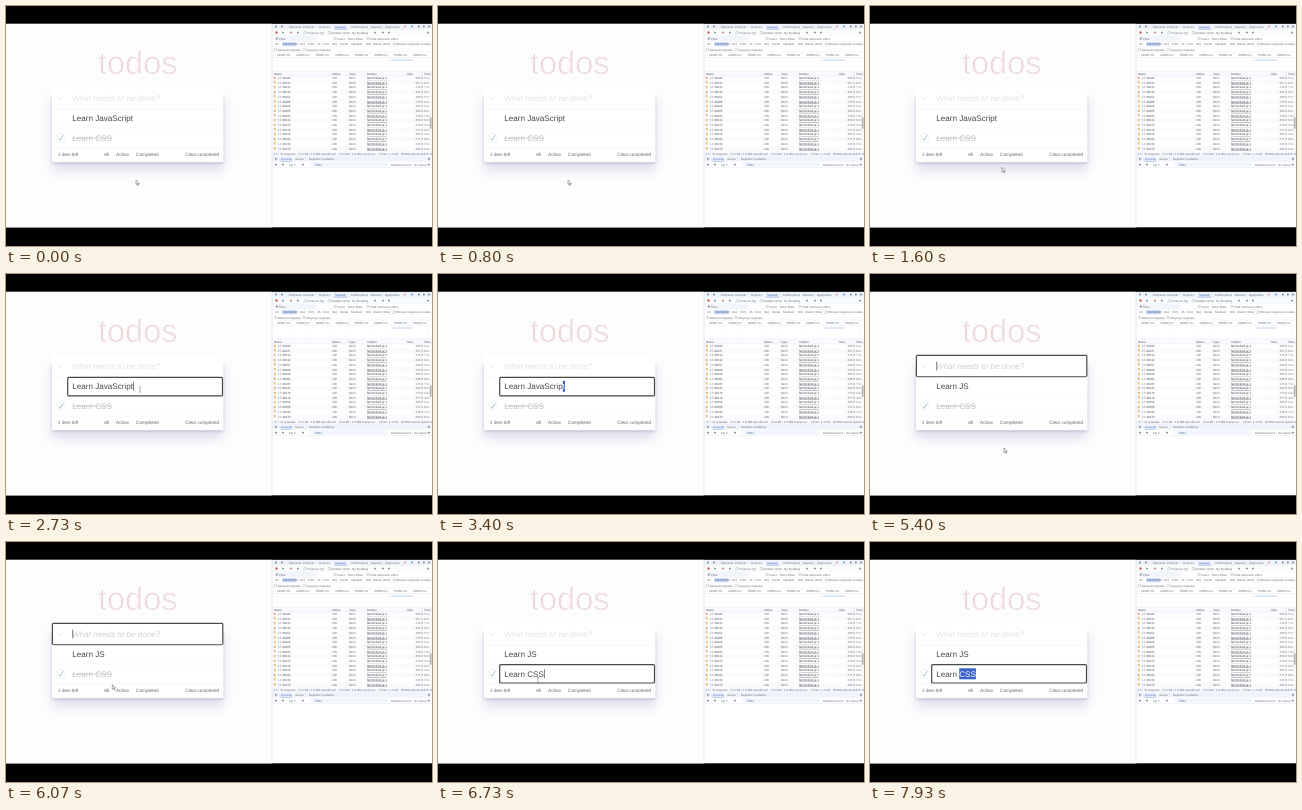
Animation, 426 px wide and 240 px high, one loop 8000 ms. Source, as an HTML page:

```html
<!DOCTYPE html>
<html lang="en">
<head>
<meta charset="utf-8">
<title>todos</title>
<style>
  html, body { margin: 0; width: 100%; height: 100%; overflow: hidden; background: #000; }
  svg { display: block; width: 100vw; height: 100vh; }
  text { font-family: "Liberation Sans", Arial, sans-serif; white-space: pre; text-rendering: geometricPrecision; }
</style>
</head>
<body>
<svg id="stage" viewBox="0 0 426 240"></svg>
<script>
const LOOP = 8000;
const INK = '#484848';
const TOP = 17.7, HEIGHT = 203.9;
const stage = document.getElementById('stage');

const text = (x, y, s, size, fill = INK, extra = '') =>
  `<text x="${x}" y="${y}" font-size="${size}" fill="${fill}" ${extra}>${s}</text>`;
const rect = (x, y, w, h, fill, extra = '') =>
  `<rect x="${x}" y="${y}" width="${w}" height="${h}" fill="${fill}" ${extra}/>`;
const line = (x1, y1, x2, y2, stroke = '#e6e9f0', w = 0.5) =>
  `<path d="M${x1} ${y1}L${x2} ${y2}" stroke="${stroke}" stroke-width="${w}"/>`;
const box = id =>
  `<rect id="${id}" fill="#fff" stroke="#4a4a46" stroke-width="1.2" rx="1"/>`;

function todoApp() {
  return `
    ${rect(0, TOP, 266, HEIGHT, '#fdfdfd')}
    ${text(92, 68, 'todos', 32.5, '#eed9da', 'stroke="#fdfdfd" stroke-width=".7"')}
    ${rect(46, 84, 171, 72, '#c4c4e4', 'filter="url(#soft)" opacity=".6" transform="translate(0 8)"')}
    ${rect(46, 90, 171.5, 67.5, '#b0b0c0', 'rx="2" filter="url(#tight)" opacity=".7"')}
    ${rect(46, 81, 171.5, 75.3, '#fff', 'rx="1"')}
    ${box('newBox')}
    <path d="M52.3 91.6l1.9 1.9 2-1.9" fill="none" stroke="#d8d8d8" stroke-width=".8"/>
    ${text(66, 95, 'What needs to be done?', 8.1, '#e2e2e2', 'font-style="italic" id="hint"')}
    ${line(46, 103, 217.5, 103, '#efefef')}
    ${line(46, 122, 217.5, 122, '#f1f1f1')}
    ${line(46, 142, 217.5, 142, '#ededed')}
    <circle cx="54.8" cy="132" r="4.8" fill="none" stroke="#dce8e6" stroke-width=".5"/>
    <path d="M52.4 132.4l1.7 2 3.2-5" fill="none" stroke="#8fb5ac" stroke-width=".8"/>
    ${box('editBox')}
    <rect id="mark" fill="#3763cb"/>
    <text id="todo0" x="66.3" y="115" font-size="8.1"></text>
    <text id="todo1" x="66.3" y="134.7" font-size="8.1"></text>
    <path id="strike" d="M66.3 132h39.6" stroke="#bdbdbd" stroke-width=".7"/>
    <rect id="caret" width=".6" height="9" fill="#333"/>
    ${[[52, '1 item left'], [98, 'All'], [110, 'Active'], [130, 'Completed'], [179, 'Clear completed']]
      .map(([x, s]) => text(x, 150.2, s, 4.7, '#686868')).join('')}
    <g id="pointer">
      <path id="arrow" d="M0 0v4.6l1.1-1 .8 1.8.8-.4-.8-1.7h1.4z" fill="#fff" stroke="#555" stroke-width=".5"/>
      <path id="beam" d="M-1 0h2M0 0v5M-1 5h2" fill="none" stroke="#666" stroke-width=".5"/>
    </g>`;
}

function devTools() {
  const grey = '#6c7078';
  const out = [];
  const label = (x, y, s, fill = grey, extra) => out.push(text(x, y, s, 3, fill, extra));
  const bar = (y, h, fill) => out.push(rect(266, y, 160, h, fill), line(266, y + h, 426, y + h));
  const icon = (x, y, fill = '#868b94') => out.push(rect(x, y, 1.8, 1.8, fill, 'rx=".4"'));
  const check = (x, y, s) => {
    out.push(rect(x, y - 2.2, 2.2, 2.2, '#fff', 'stroke="#8b9098" stroke-width=".35" rx=".3"'));
    label(x + 3.2, y, s);
  };

  out.push(rect(266, TOP, 160, HEIGHT, '#fff'));

  bar(TOP, 5.8, '#eff3fc');
  [269, 275].forEach(x => icon(x, 19.6));
  [[283, 'Elements'], [297, 'Console'], [313, 'Sources'], [345, 'Performance'],
   [365, 'Memory'], [379, 'Application']].forEach(([x, s]) => label(x, 21.6, s));
  label(329, 21.6, 'Network', '#3d68bd');
  out.push(rect(328, 22.8, 13, 0.8, '#5a82d0'));
  icon(398, 19.6, '#e5a29c');
  icon(405, 19.6, '#6f98e2');
  [412, 417, 422].forEach(x => icon(x, 19.6));

  bar(23.5, 6, '#fbfcfe');
  out.push('<circle cx="270.5" cy="26.6" r="1.3" fill="#dc6962"/>');
  [276, 291].forEach(x => icon(x, 25.7));
  icon(284, 25.7, '#d6746c');
  check(298, 27.8, 'Preserve log');
  check(322, 27.8, 'Disable cache');
  label(346, 27.8, 'No throttling');
  [368, 376, 382, 421].forEach(x => icon(x, 25.7));

  bar(29.5, 6, '#fff');
  out.push(rect(268.5, 30.3, 42, 4.4, '#f0f4fb', 'rx="2"'));
  icon(270, 31.6);
  label(273, 33.6, 'Filter');
  check(328, 33.6, 'Invert');
  label(342, 33.6, 'More filters');
  check(361, 33.6, 'Hide extension URLs');

  bar(35.5, 5.5, '#fff');
  out.push(rect(276, 36.3, 14.5, 4, '#cbdcf8', 'rx="1"'));
  label(269, 39.4, 'All');
  label(277, 39.4, 'Fetch/XHR', '#314c7c');
  [[294, 'Doc'], [302, 'CSS'], [311, 'JS'], [317, 'Font'], [326, 'Img'], [334, 'Media'],
   [345, 'Manifest'], [360, 'WS'], [367, 'Wasm'], [377, 'Other']].forEach(([x, s]) => label(x, 39.4, s));
  check(387, 39.4, 'Blocked response cookies');

  bar(41, 5, '#fff');
  check(268.5, 44.5, 'Blocked requests');
  check(297, 44.5, '3rd-party requests');

  for (let i = 0; i < 8; i++) {
    const x = 285 + i * 19.5;
    out.push(line(x, 46, x, 65, '#f0f2f6', 0.4));
    label(x - 1, 49.6, `${i + 1}0000 ms`, grey, 'text-anchor="end"');
  }
  out.push(line(266, 51.5, 426, 51.5), line(385, 54, 407, 54, '#aac6ea', 0.7));

  out.push(rect(266, 65, 160, 4.8, '#f8fafd'), line(266, 65, 426, 65), line(266, 69.8, 426, 69.8));
  [[268, 'Name'], [326, 'Status'], [343, 'Type'], [361, 'Initiator'], [401, 'Size'], [418, 'Time']]
    .forEach(([x, s]) => label(x, 68.6, s, '#555960'));

  for (let i = 0; i < 16; i++) {
    const y = 73 + i * 4.7;
    if (i % 2) out.push(rect(266, y - 3.4, 157, 4.7, '#fafbfd'));
    out.push(rect(268, y - 2, 1.8, 2, '#f7d9a8', 'stroke="#dda462" stroke-width=".3"'));
    label(272, y, `17.${38400 + (i * 37) % 97}`, '#555960');
    label(326, y, '200', '#696d74');
    label(343, y, 'fetch', '#595d64');
    label(361, y, 'fetch/client.js:1', '#34383e', 'text-decoration="underline"');
    label(409.5, y, `${260 + (i * 7) % 20} B`, '#696d74');
    label(418, y, `${3 + (i * 5) % 6} ms`, '#696d74');
  }
  [324, 341, 359, 399, 408, 416].forEach(x => out.push(line(x, 65, x, 145, '#eef0f5', 0.4)));
  out.push(rect(423.3, 70, 2.7, 75, '#f8f8f8'), rect(423.8, 111, 1.7, 12, '#b0b2b6', 'rx=".8"'));

  bar(145, 5, '#f8fafd');
  label(268, 148.5, '57 / 78 requests');
  label(292, 148.5, '15.2 kB / 1.9 MB transferred');
  label(333, 148.5, '14.8 kB / 1.9 MB resources');
  label(373, 148.5, 'Finish: 1.4 min');
  label(395, 148.5, 'DOMContentLoaded: 82 ms');

  bar(150, 5.5, '#eff3fc');
  icon(269, 151.9);
  label(275, 154, 'Console', '#3d68bd');
  out.push(rect(274.5, 154.9, 11.5, 0.7, '#5a82d0'));
  label(289, 154, 'Issues');
  label(303, 154, 'Network conditions');
  icon(422, 151.9);

  bar(155.5, 6, '#fff');
  [269, 276].forEach(x => icon(x, 157.7));
  label(283, 159.6, 'top ▾');
  icon(296, 157.7);
  out.push(rect(304, 156.4, 78, 4.2, '#f0f4fb', 'rx="2"'));
  label(309, 159.6, 'Filter', '#3d5f9c');
  label(385, 159.6, 'Default levels ▾');
  label(408, 159.6, 'No issues');
  icon(422, 157.7);

  out.push(line(266, TOP, 266, TOP + HEIGHT, '#dcdce6', 0.7));
  return out.join('');
}

stage.innerHTML = `
  <defs>
    <filter id="soft" x="-30%" y="-50%" width="160%" height="200%"><feGaussianBlur stdDeviation="6"/></filter>
    <filter id="tight" x="-10%" y="-10%" width="120%" height="120%"><feGaussianBlur stdDeviation=".8"/></filter>
  </defs>
  ${rect(0, 0, 426, 240, '#000')}
  ${todoApp()}
  <clipPath id="panel">${rect(265, TOP, 161, HEIGHT, '#fff')}</clipPath>
  <g clip-path="url(#panel)">${devTools()}</g>`;

const el = id => document.getElementById(id);
const set = (id, attrs) => {
  for (const k in attrs) el(id).setAttribute(k, attrs[k]);
};
const show = (id, on) => set(id, { visibility: on ? 'visible' : 'hidden' });
const clamp = (v, lo, hi) => Math.min(hi, Math.max(lo, v));
const between = (t, a, b) => t >= a && t < b;

const EDIT1 = 2450, TYPE = 4540, ENTER = 4950, EDIT2 = 6350;
const path = [
  [0, 130, 174], [1150, 130, 174], [1600, 132, 161.5], [2300, 134, 113],
  [4950, 134, 113], [5300, 134, 174], [5600, 134, 174], [6250, 100, 135.5], [8000, 100, 135.5]
];

function pointerAt(t) {
  const i = path.findIndex(p => p[0] > t);
  const [t0, x0, y0] = path[i - 1], [t1, x1, y1] = path[i];
  const u = (t - t0) / (t1 - t0), e = u * u * (3 - 2 * u);
  return [x0 + (x1 - x0) * e, y0 + (y1 - y0) * e];
}

function write(id, s, picked, fill) {
  const cut = s.length - picked;
  el(id).innerHTML = `<tspan>${s.slice(0, cut)}</tspan><tspan fill="#fff">${s.slice(cut)}</tspan>`;
  set(id, { fill });
}

function render(t) {
  const row = between(t, EDIT1, ENTER) ? 0 : t >= EDIT2 ? 1 : -1;
  const focused = between(t, ENTER, EDIT2);
  const picks = [
    t < TYPE ? clamp(Math.floor((t - 3200) / 110), 0, 9) : 0,
    clamp(Math.floor((t - 7100) / 200), 0, 3)
  ];
  const words = [t < TYPE ? 'Learn JavaScript' : 'Learn JS', 'Learn CSS'];
  const picked = row < 0 ? 0 : picks[row];

  write('todo0', words[0], row === 0 ? picked : 0, INK);
  write('todo1', words[1], row === 1 ? picked : 0, row === 1 ? INK : '#c2c2c2');
  show('strike', row !== 1);

  show('newBox', focused);
  set('newBox', { x: 46.4, y: 81.4, width: 170.4, height: 21.2 });
  set('hint', { fill: focused ? '#cfcfcf' : '#e2e2e2' });
  show('editBox', row >= 0);
  set('editBox', { x: 61.7, y: 103.4 + row * 19.2, width: 154.8, height: 18.4 });

  let caretX = 66.5, caretY = 87.5;
  show('mark', picked > 0);
  if (row >= 0) {
    const node = el('todo' + row), n = words[row].length;
    const end = 66.3 + node.getSubStringLength(0, n);
    const start = 66.3 + node.getSubStringLength(0, n - picked);
    const y = row ? 126.3 : 106.8;
    set('mark', { x: start, y, width: Math.max(0, end - start), height: 11 });
    caretX = end + 0.3;
    caretY = y + 1;
  }
  set('caret', { x: caretX, y: caretY });
  const since = row === 0 ? (t >= TYPE ? TYPE : EDIT1) : row === 1 ? EDIT2 : ENTER;
  show('caret', (row >= 0 || focused) && !picked && (t - since) % 1060 < 530);

  const [px, py] = pointerAt(t);
  const typing = between(t, 3200, ENTER) || t >= 7100;
  set('pointer', { transform: `translate(${px} ${py})` });
  show('arrow', !typing && row < 0);
  show('beam', !typing && row >= 0);
}

const began = performance.now();
function tick() {
  render((performance.now() - began) % LOOP);
  requestAnimationFrame(tick);
}
tick();
</script>
</body>
</html>
```
